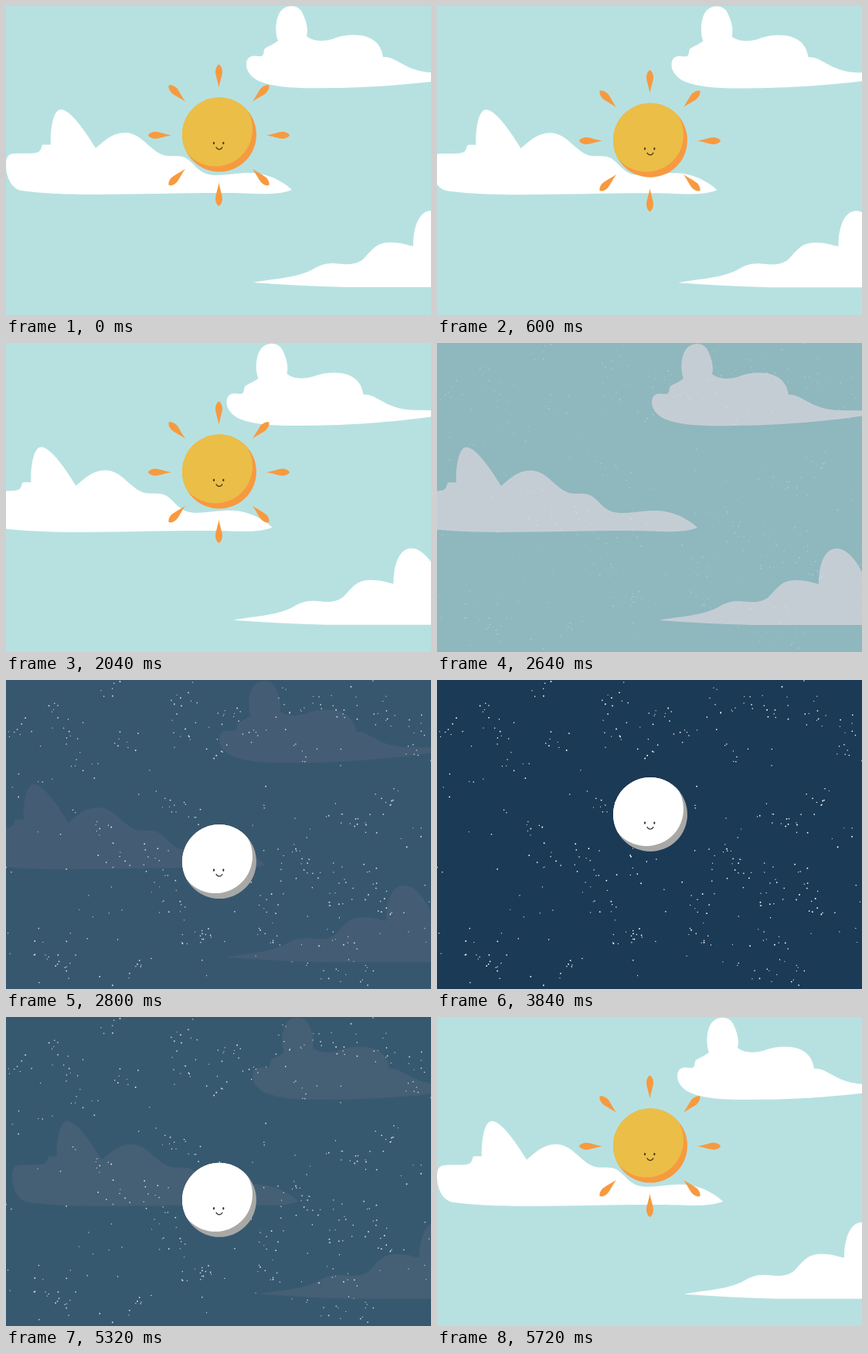
Animation of 550x400 px, one loop 5.76 s. Source, as an HTML page with a canvas:

```html
<!DOCTYPE html>
<html lang="en">
<head>
<meta charset="utf-8">
<title>Day and night</title>
<style>
  html, body { margin: 0; width: 100%; height: 100%; overflow: hidden; background: #b7e1e1; }
  canvas { display: block; }
</style>
</head>
<body>
<canvas id="stage" width="550" height="400"></canvas>
<script>
const ctx = document.getElementById('stage').getContext('2d');
const LOOP = 5760, BOB = 1040, SLIDE = 390;

const clamp = v => Math.max(0, Math.min(1, v));
const smooth = v => { v = clamp(v); return v * v * (3 - 2 * v); };

const clouds = [
  `M311 76C311 66 318 63 326 65C334 66 333 62 334 57C335 53 345 51 352 45
   C348 36 348 16 356 6C363-2 376-2 382 6C387 15 392 28 389 39
   C397 46 410 46 422 43C436 37 455 36 467 40C481 45 486 54 488 66
   C498 65 505 71 515 76C525 82 540 86 552 86L620 87
   C570 98 480 106 420 106C380 107 345 106 325 96C316 91 311 83 311 76Z`,
  `M0 205C0 194 4 191 12 191C22 190 34 192 42 189C47 186 45 180 48 179.5L58 179.5
   C57 165 60 134 71 134C84 134 105 166 116 184C126 176 137 164 154 164
   C178 164 188 193 210 194C222 194 228 193 236 199C247 208 252 220 275 219
   C295 218 310 214 328 217C346 220 362 230 370 238C352 245 330 243 310 242.5
   C260 241 180 244 115 244C75 244 40 242 20 239C6 236 0 220 0 205Z`,
  `M320 358C345 353 375 352 395 342C405 336 412 333 424 333C438 334 450 337 462 328
   C472 318 478 306 497 306C510 306 518 309 527 311C527 285 535 265 550 265
   C565 265 580 285 586 304L640 312L640 364L440 364C400 363 360 361 320 358Z`
].map(d => new Path2D(d));

const ray = new Path2D('M0-61.5C-1-68-4.5-78-4.5-82C-4.5-87-2-91 0-91.5C2-91 4.5-87 4.5-82C4.5-78 1-68 0-61.5Z');

// Centres of the star clusters, as x, y pairs
const clusters = [
  130,10, 85,70, 95,110, 20,68, 60,35, 150,78, 235,70, 262,88, 320,65, 285,50,
  220,22, 365,30, 405,25, 438,38, 390,95, 485,40, 525,60, 530,98, 490,160, 465,190,
  435,185, 385,220, 400,250, 435,255, 470,258, 355,240, 340,285, 215,300, 240,328, 270,330,
  330,325, 55,350, 80,370, 190,230, 135,230, 210,160, 245,170, 260,240, 425,290, 480,298,
  430,385, 470,385, 435,340, 120,190, 205,268, 165,370
];

let seed = 7;
const random = () => (seed = seed * 16807 % 2147483647) / 2147483647;
const stars = new Path2D();

function addStar(x, y) {
  const r = 0.55 + random() * 0.4;
  stars.moveTo(x + r, y);
  stars.arc(x, y, r, 0, 7);
}

for (let i = 0; i < clusters.length; i += 2) {
  for (let n = 0; n < 7; n++) {
    const dx = random() + random() - 1, dy = random() + random() - 1;
    addStar(clusters[i] + dx * 24, clusters[i + 1] + dy * 22);
  }
}
for (let n = 0; n < 130; n++) addStar(random() * 550, random() * 400);

function disc(x, y) {
  ctx.beginPath();
  ctx.arc(x, y, 48, 0, 7);
}

function drawBody(y, light, shade, ink) {
  ctx.save();
  ctx.translate(276, y);
  disc(0, 0);
  ctx.fillStyle = shade;
  ctx.fill();
  ctx.save();
  ctx.clip();
  disc(-5, -7);
  ctx.fillStyle = light;
  ctx.fill();
  // Leave no shaded fringe on the lit edge
  ctx.restore();
  ctx.beginPath();
  ctx.arc(0, 0, 47.5, 2.65, 5.4);
  ctx.strokeStyle = light;
  ctx.lineWidth = 1;
  ctx.stroke();

  ctx.fillStyle = ctx.strokeStyle = ink;
  for (const x of [-7, 5.3]) {
    ctx.beginPath();
    ctx.ellipse(x, 11, 1.1, 1.8, 0, 0, 7);
    ctx.fill();
  }
  ctx.beginPath();
  ctx.moveTo(-4.2, 16);
  ctx.bezierCurveTo(-2.5, 20, 2.5, 20, 4, 16);
  ctx.lineWidth = 1.2;
  ctx.stroke();
  ctx.restore();
}

function drawRays(y) {
  ctx.fillStyle = '#f79a3f';
  for (let i = 0; i < 8; i++) {
    ctx.save();
    ctx.translate(275.5, y + 0.7);
    ctx.rotate(i * Math.PI / 4);
    ctx.fill(ray);
    ctx.restore();
  }
}

// Slides up until `rise`, bobs, then drops from `set`
function bodyY(t, middle, rise, set) {
  const away = clamp((rise - t) / SLIDE) ** 3 + clamp((t - set) / SLIDE) ** 3;
  return middle - 4 * Math.cos((t - rise) / BOB * 2 * Math.PI) + 345 * away;
}

function draw(t) {
  const night = smooth((t - 2510) / 400) - smooth((t - 5210) / 400);
  const evening = t < 4060;

  ctx.fillStyle = '#b7e1e1';
  ctx.fillRect(0, 0, 550, 400);

  ctx.save();
  ctx.translate(evening ? -t * 0.0125 : Math.max(0, 5720 - t) * 0.02,
                evening ? Math.min(1, t * 0.0004) : 0.8);
  ctx.fillStyle = '#fff';
  clouds.forEach(c => ctx.fill(c));
  ctx.restore();

  ctx.globalAlpha = night;
  ctx.fillStyle = '#1b3a56';
  ctx.fillRect(0, 0, 550, 400);
  ctx.fillStyle = '#fff';
  ctx.fill(stars);
  ctx.globalAlpha = 1;

  const sunY = bodyY(evening ? t : t - LOOP, 170.5, -20, 2170);
  drawRays(sunY);
  drawBody(sunY, '#ebbe48', '#f79a3f', '#4a3a18');
  drawBody(bodyY(t, 175, 3020, 5100), '#fff', '#a8a8a6', '#333');
}

const start = performance.now();
function tick() {
  draw((performance.now() - start) % LOOP);
  requestAnimationFrame(tick);
}
tick();
</script>
</body>
</html>
```
